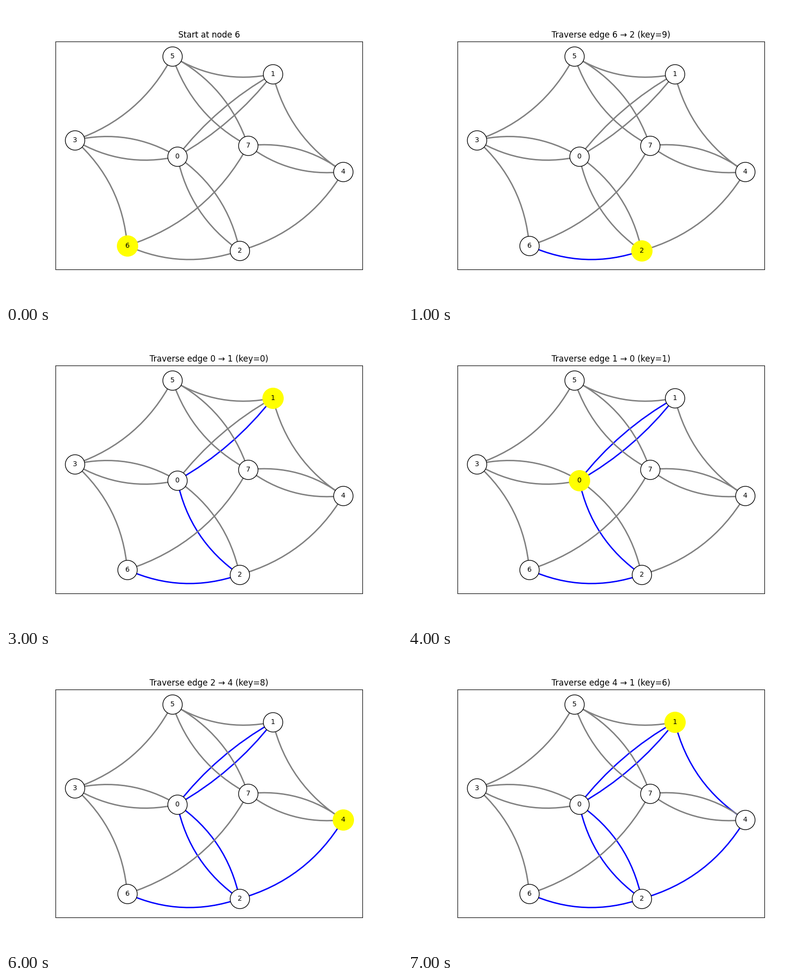
Animation of 800 by 600 pixels, one loop 8000 ms. Source, as a matplotlib script:

```python
from itertools import combinations

import matplotlib.pyplot as plt
import numpy as np
from matplotlib.animation import FuncAnimation
from matplotlib.patches import PathPatch
from matplotlib.path import Path

# Node centres in pixels, y pointing down
NODES = np.array([
    (346, 305), (539, 138), (472, 496), (139, 272),
    (681, 336), (336, 102), (245, 486), (489, 283),
])
START, END = 6, 7
STEPS = 8


def cube_edges():
    """Edges of a cube, doubled at its two poles so that a trail from
    START to END can use each one once. The list index is the edge key."""
    corners = [set(c) for r in range(4) for c in combinations(range(3), r)]
    edges = []
    for a, b in combinations(range(8), 2):
        if corners[a] < corners[b] and len(corners[b] - corners[a]) == 1:
            at_pole = a == 0 or b == 7
            doubled = at_pole and (a, b) != (START, END)
            edges += [(a, b)] * (1 + doubled)
    return edges


def greedy_walk(edges):
    """Always leave by the unused edge with the lowest key."""
    node, used = START, []
    walk = [(node, f"Start at node {node}", [])]
    while len(walk) < STEPS:
        key = next(k for k, e in enumerate(edges)
                   if node in e and k not in used)
        target = sum(edges[key]) - node
        used.append(key)
        text = f"Traverse edge {node} → {target} (key={key})"
        walk.append((target, text, used[:]))
        node = target
    return walk


def arc(a, b, key):
    """Quadratic curve from a to b; even and odd keys bulge opposite ways."""
    bend = min(0.1 * (1 + key // 2), 0.2) * (-1) ** key
    dx, dy = b - a
    control = (a + b) / 2 + bend * np.array([-dy, dx])
    return Path([a, control, b], [Path.MOVETO, Path.CURVE3, Path.CURVE3])


EDGES = cube_edges()
WALK = greedy_walk(EDGES)

plt.rcParams["font.family"] = "DejaVu Sans"
fig, ax = plt.subplots(figsize=(8, 6), dpi=100)
ax.set(xlim=(100, 720), ylim=(534, 72), xticks=[], yticks=[])

lines = [
    ax.add_patch(PathPatch(arc(NODES[a], NODES[b], key), fill=False,
                           edgecolor="gray", linewidth=2, zorder=1))
    for key, (a, b) in enumerate(EDGES)
]
ax.scatter(*NODES.T, s=800, c="white", edgecolors="black",
           linewidths=1, zorder=2)
marker = ax.scatter(*NODES[START], s=900, c="yellow", edgecolors="yellow",
                    linewidths=1, zorder=2.2)
for i, (x, y) in enumerate(NODES):
    ax.text(x, y, str(i), fontsize=10, ha="center", va="center", zorder=3)
title = ax.set_title("", fontsize=12)


def draw(step):
    node, text, used = WALK[step]
    for key, line in enumerate(lines):
        line.set_edgecolor("blue" if key in used else "gray")
    marker.set_offsets([NODES[node]])
    title.set_text(text)
    return [*lines, marker, title]


anim = FuncAnimation(fig, draw, frames=STEPS, interval=1000,
                     repeat=True, repeat_delay=0, blit=False)
plt.show()
```
